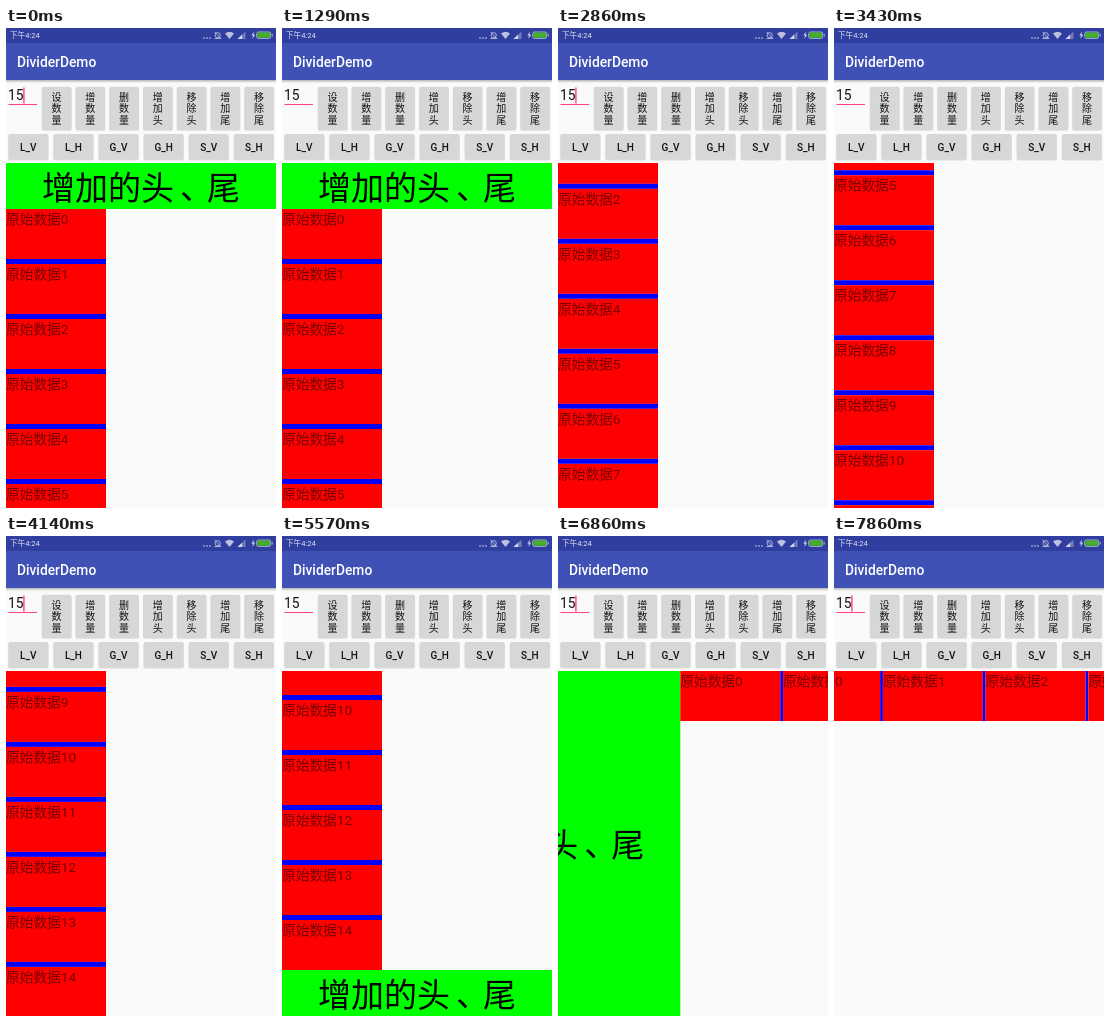
Animation of 270x480 px, one loop 8000 ms. Source, as an HTML page:

```html
<!DOCTYPE html>
<html lang="zh">
<head>
<meta charset="utf-8">
<style>
  html, body { margin: 0; height: 100%; overflow: hidden; background: #fafafa; }
  svg { display: block; }
  text { font-family: Roboto, "Noto Sans CJK SC", "Noto Sans CJK", sans-serif; }
  .item { font-size: 13.7px; fill: #000; fill-opacity: .54; }
  .band { font-size: 33px; text-anchor: middle; }
  .label { font-size: 10px; text-anchor: middle; fill: #111; }
  .bold { font-weight: 500; }
</style>
</head>
<body>
<svg id="stage" width="270" height="480" viewBox="0 0 270 480"></svg>
<script>
const LOOP = 8000, COUNT = 15, SWITCH = 5850;

const rect = (x, y, w, h, fill, extra = '') =>
  `<rect x="${x}" y="${y}" width="${w}" height="${h}" fill="${fill}" ${extra}/>`;
const text = (x, y, str, cls = '', extra = '') =>
  `<text x="${x}" y="${y}" class="${cls}" ${extra}>${str}</text>`;
const repeat = (n, fn) => Array.from({ length: n }, (_, i) => fn(i)).join('');

// The enumeration comma sits nearer the middle of its cell.
const bandLabel = '增加的头<tspan dx="6" dy="-1">、</tspan><tspan dx="-6" dy="1">尾</tspan>';
const band = (x, y, h) => rect(x, y, 270, h, '#0f0') +
  text(x + 135, y + h / 2 + 13.8, bandLabel, 'band');
const item = (x, y, i) => rect(x, y, 100, 50, '#f00') + text(x, y + 15, '原始数据' + i, 'item');

function verticalList() {
  const cells = repeat(COUNT, i => {
    const y = 46 + i * 55;
    return item(0, y, i) + (i < COUNT - 1 ? rect(0, y + 50, 100, 5, '#00f') : '');
  });
  return band(0, 0, 46) + cells + band(0, 46 + COUNT * 55 - 5, 46);
}

function horizontalList() {
  const cells = repeat(COUNT, i => {
    const x = 270 + i * 102.75;
    return item(x, 0, i) + rect(x + 100, 0, 2.75, 50, '#00f');
  });
  return band(0, 0, 345) + cells;
}

const button = (x, y, w, h) =>
  rect(x - .3, y + .6, w + .6, h + .6, '#000', 'rx="2" opacity=".13"') +
  rect(x, y, w, h, '#d6d7d7', 'rx="1.5"');

const tallButtons = ['设数量', '增数量', '删数量', '增加头', '移除头', '增加尾', '移除尾']
  .map((name, i) => {
    const x = 36 + i * 33.75;
    return button(x, 58.8, 29.3, 42.7) +
      [...name].map((c, k) => text(x + 14.6, 72.7 + k * 11.7, c, 'label')).join('');
  }).join('');

const wideButtons = ['L_V', 'L_H', 'G_V', 'G_H', 'S_V', 'S_H']
  .map((name, i) => {
    const x = 2.5 + i * 45.1;
    return button(x, 106, 39.7, 25.3) + text(x + 19.8, 122.8, name, 'label bold');
  }).join('');

const statusIcons = `
  <g fill="#fff" opacity=".8">
    <circle cx="198" cy="10" r=".8"/><circle cx="201" cy="10" r=".8"/><circle cx="204" cy="10" r=".8"/>
    <path d="M219 5.5Q223.5 2 228 5.5L223.5 11Z" opacity=".85"/>
    <path d="M231.5 11L239.5 3.5V11Z" opacity=".4"/><path d="M231.5 11L236 6.8V11Z"/>
    <path d="M248 3.5l-2.6 4h1.7l-.8 3.6 2.8-4.4h-1.7z"/>
  </g>
  <g fill="none" stroke="#fff" stroke-width=".8" opacity=".75">
    <circle cx="211.7" cy="7.2" r="2.6"/><path d="M208.5 3.8l6.4 6.8M208.4 10.5h6.6"/>
    <rect x="250.7" y="4" width="14" height="6.4" rx="1.8"/><path d="M266.2 5.9v2.6"/>
  </g>` + rect(251.3, 4.6, 12.8, 5.2, '#43b02a', 'rx="1.2"');

document.getElementById('stage').innerHTML = `
  <defs><linearGradient id="shade" x2="0" y2="1">
    <stop stop-opacity=".28"/><stop offset="1" stop-opacity="0"/>
  </linearGradient></defs>` +
  rect(0, 0, 270, 480, '#fafafa') +
  `<svg y="135" width="270" height="345">
    <g id="vertical">${verticalList()}</g><g id="horizontal">${horizontalList()}</g>
  </svg>` +
  rect(0, 0, 270, 15, '#303f9f') + rect(0, 15, 270, 37, '#3f51b5') +
  rect(0, 52, 270, 3, 'url(#shade)') +
  text(4, 10.4, '下午4:24', '', 'font-size="7.6" fill="#fff" fill-opacity=".85"') + statusIcons +
  text(11, 38.7, 'DividerDemo', 'bold', 'font-size="13.8" fill="#fff"') +
  text(2, 72.4, '15', '', 'font-size="13.8" fill="#111"') +
  rect(2.5, 76, 28.5, 1, '#ff4081') +
  rect(17.2, 59.5, 1.4, 16, '#ff4081', 'id="cursor"') +
  tallButtons + wideButtons;

// Smooth monotone curve through [time, value] points, at rest on both ends.
function follow(points, t) {
  const last = points.length - 1;
  if (t <= points[0][0]) return points[0][1];
  if (t >= points[last][0]) return points[last][1];
  const secant = i => (points[i + 1][1] - points[i][1]) / (points[i + 1][0] - points[i][0]);
  const slope = i => {
    if (i === 0 || i === last) return 0;
    const a = secant(i - 1), b = secant(i);
    return 2 * a * b / (a + b);
  };
  const i = points.findIndex(p => p[0] > t) - 1;
  const [t0, v0] = points[i], [t1, v1] = points[i + 1];
  const d = t1 - t0, u = (t - t0) / d, w = 1 - u;
  return v0 * w * w * (1 + 2 * u) + v1 * u * u * (3 - 2 * u) +
    d * u * w * (slope(i) * w - slope(i + 1) * u);
}

const scrollY = [[1600, 0], [2000, 35], [2860, 130], [4140, 520], [4990, 567]];
const scrollX = [[6250, 0], [6860, 147.5], [7860, 323.75], [8300, 365]];
const [vertical, horizontal, cursor] =
  ['vertical', 'horizontal', 'cursor'].map(id => document.getElementById(id));
const show = (el, on) => el.setAttribute('visibility', on ? 'visible' : 'hidden');

function draw(now) {
  const t = now % LOOP;
  show(vertical, t < SWITCH);
  show(horizontal, t >= SWITCH);
  vertical.setAttribute('transform', `translate(0 ${-follow(scrollY, t)})`);
  horizontal.setAttribute('transform', `translate(${-follow(scrollX, t)} 0)`);
  show(cursor, Math.floor((t + 295) / 500) % 2 === 0);
  requestAnimationFrame(draw);
}
draw(performance.now());
</script>
</body>
</html>
```
